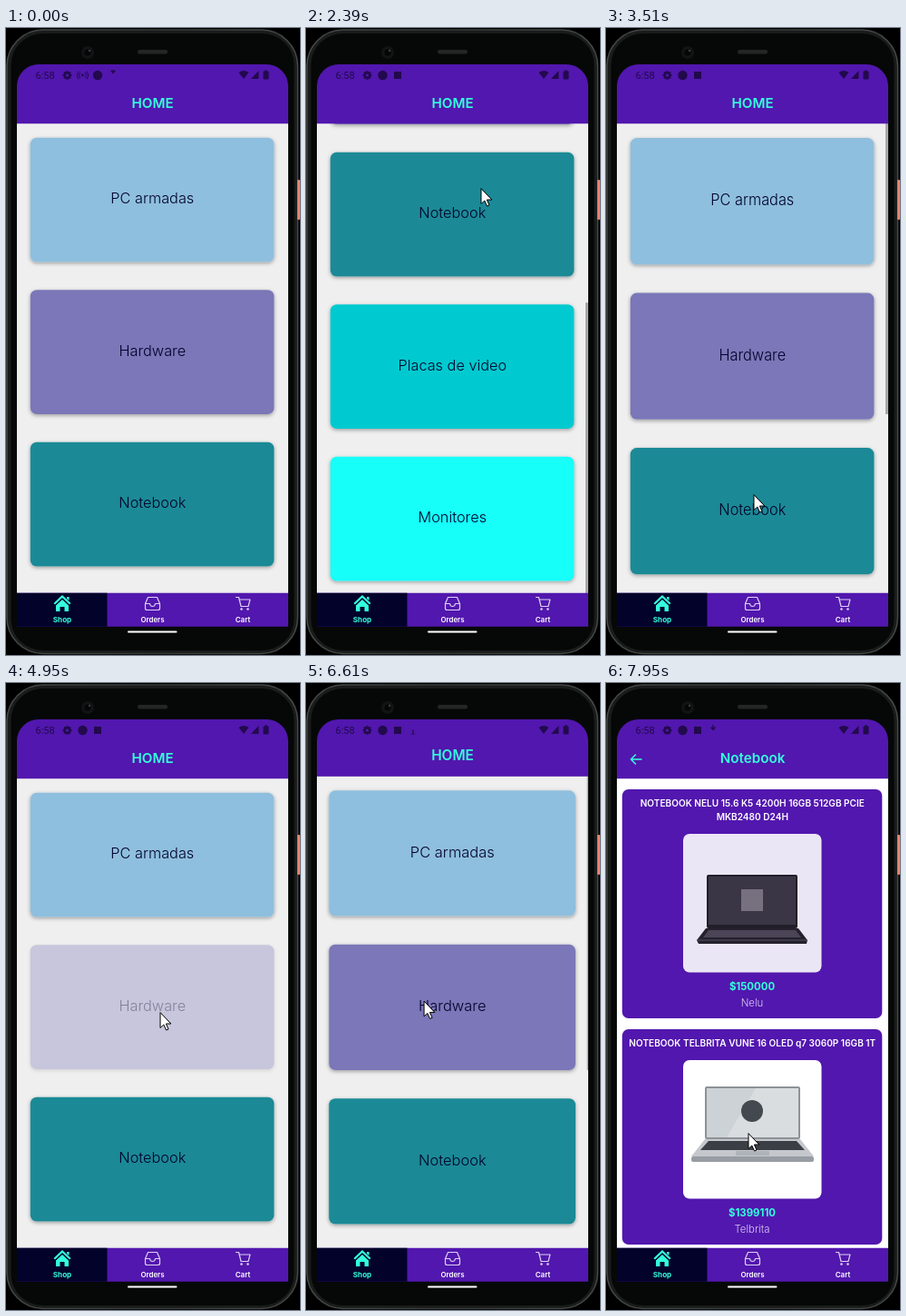
An HTML page with a canvas for the animation above (8 s loop, 324 by 690 pixels).

```html
<!DOCTYPE html>
<html lang="es">
<head>
<meta charset="utf-8">
<title>Shop app</title>
<style>
html, body { margin: 0; width: 100%; height: 100%; overflow: hidden; background: #000; }
canvas { display: block; width: 324px; height: 690px; }
</style>
</head>
<body>
<canvas id="stage"></canvas>
<script>
const W = 324, H = 690, LOOP = 8000;
const PURPLE = '#5217ae', MINT = '#33ffdc', NAVY = '#02022b', PALE = '#dccff2', PAGE = '#efefef';
const VIEW = { x: 12, top: 40, list: 105, width: 299 };
const canvas = document.getElementById('stage');
const ctx = canvas.getContext('2d');
const ratio = window.devicePixelRatio || 1;
canvas.width = W * ratio;
canvas.height = H * ratio;

const categories = [
  ['PC armadas', '#8fbfde'], ['Hardware', '#7b77b8'], ['Notebook', '#1b8a96'],
  ['Placas de video', '#00cacf'], ['Monitores', '#16fff9']
];
const notebooks = [
  { title: ['NOTEBOOK NELU 15.6 K5 4200H 16GB 512GB PCIE', 'MKB2480 D24H'], price: '$150000', brand: 'Nelu', tone: '#ebe6f5', art: darkLaptop },
  { title: ['NOTEBOOK TELBRITA VUNE 16 OLED q7 3060P 16GB 1T'], price: '$1399110', brand: 'Telbrita', tone: '#fff', art: silverLaptop }
];
const hardware = [
  { title: ['PLACA MADRE TORVANE B40 DDR4 MICRO ATX 4 SLOTS', 'HDMI USB 3.2'], price: '$28500', brand: 'Torvane', tone: '#fff', art: board },
  { title: ['MEMORIA RAM LUMEDO 16GB DDR4 3200MHZ'], price: '$19900', brand: 'Lumedo', tone: '#fff', art: memory }
];

// Keyframes: [time, value, ...], linear in between
const cursorKeys = [
  [880, 286, 600], [1180, 198, 417], [1360, 195, 380], [1700, 193, 200], [1800, 193, 177],
  [2560, 193, 177], [3250, 163, 514], [3515, 163, 514], [3890, 170, 363], [5250, 170, 363],
  [5730, 106, 398], [5800, 106, 398], [6140, 27, 78], [6330, 27, 78], [6610, 130, 350], [6950, 157, 496]
];
const scrollKeys = [[1200, 0], [1360, 33], [1700, 213], [1950, 319], [2580, 319], [3210, 0]];
const stretchKeys = [[3200, 0], [3250, .018], [3515, .018], [3870, 0]];
const barKeys = [[1200, 0], [1260, 1], [3600, 1], [3890, 0], [6330, 0], [6340, 1], [6900, 1], [7070, 0]];
const pressKeys = {
  Hardware: [[4470, 1], [4630, .2], [4920, .2], [4950, .34], [5100, 1]],
  Notebook: [[7070, 1], [7230, .2], [7380, .2], [7530, 1]]
};
const OPEN_HARDWARE = 5060, GO_BACK = 6324, OPEN_NOTEBOOK = 7440, SWITCH = 500;

const clamp = v => Math.max(0, Math.min(1, v));

function at(keys, t, column = 1) {
  if (t <= keys[0][0]) return keys[0][column];
  for (let i = 1; i < keys.length; i++) {
    const a = keys[i - 1], b = keys[i];
    if (t < b[0]) return a[column] + (b[column] - a[column]) * (t - a[0]) / (b[0] - a[0]);
  }
  return keys[keys.length - 1][column];
}

function box(x, y, w, h, color, r = 0) {
  ctx.fillStyle = color;
  ctx.beginPath();
  ctx.roundRect(x, y, w, h, r);
  ctx.fill();
}

function disc(x, y, r, color) {
  ctx.fillStyle = color;
  ctx.beginPath();
  ctx.arc(x, y, r, 0, 7);
  ctx.fill();
}

function shape(d, color) {
  ctx.fillStyle = color;
  ctx.fill(new Path2D(d));
}

function line(d, color, width = 1) {
  ctx.strokeStyle = color;
  ctx.lineWidth = width;
  ctx.lineCap = ctx.lineJoin = 'round';
  ctx.stroke(new Path2D(d));
}

function text(str, x, y, size, color, weight = 400) {
  ctx.font = `${weight} ${size}px Inter, sans-serif`;
  ctx.textAlign = 'center';
  ctx.textBaseline = 'alphabetic';
  ctx.fillStyle = color;
  ctx.fillText(str, x, y + size * .36);
}

function scoped(draw) {
  ctx.save();
  draw();
  ctx.restore();
}

function clipBox(x, y, w, h, r = 0) {
  ctx.beginPath();
  ctx.roundRect(x, y, w, h, r);
  ctx.clip();
}

function header(title) {
  box(VIEW.x, VIEW.top, VIEW.width, 65.3, PURPLE);
  text(title, 161.5, 82.7, 15.2, MINT, 600);
}

function homeScreen(t) {
  const scroll = at(scrollKeys, t);
  box(VIEW.x, VIEW.list, VIEW.width, 517, PAGE);
  scoped(() => {
    clipBox(VIEW.x, VIEW.list, VIEW.width, 517);
    scoped(() => {
      ctx.translate(0, VIEW.list);
      ctx.scale(1, 1 + at(stretchKeys, t));
      ctx.translate(0, -VIEW.list - scroll);
      categories.forEach(([name, color], i) => {
        const y = 120.8 + i * 167.5;
        const press = pressKeys[name] ? at(pressKeys[name], t) : 1;
        scoped(() => {
          ctx.shadowColor = `rgba(0,0,0,${.35 * press})`;
          ctx.shadowBlur = 4 * ratio;
          ctx.shadowOffsetY = 1.5 * ratio;
          box(26.8, y, 268.7, 136.7, PAGE, 7);
        });
        scoped(() => {
          ctx.globalAlpha *= press;
          box(26.8, y, 268.7, 136.7, color, 7);
          text(name, 161.3, y + 66.8, 16.3, NAVY, 300);
        });
      });
    });
    ctx.globalAlpha *= at(barKeys, t);
    box(308, VIEW.list + scroll * .618, 3, 320, '#a5a5a8');
  });
  header('HOME');
}

function productScreen(title, products) {
  box(VIEW.x, VIEW.list, VIEW.width, 517, '#fff');
  let y = 117;
  for (const p of products) {
    const imageY = y + 19 + 15 * p.title.length;
    box(17.8, y, 286.5, imageY + 203 - y, PURPLE, 7);
    p.title.forEach((row, i) => text(row, 161.3, y + 15.5 + i * 15, 10.1, '#fff', 600));
    box(85, imageY, 152.5, 152.5, p.tone, 7);
    scoped(() => {
      ctx.translate(85, imageY);
      p.art();
    });
    text(p.price, 161, imageY + 168, 11.4, MINT, 700);
    text(p.brand, 161, imageY + 186, 11.4, PALE, 300);
    y = imageY + 215;
  }
  header(title);
  line('M39 84H28M32.5 79L27.5 84L32.5 89', MINT, 1.5);
}

function darkLaptop() {
  box(26, 45, 100, 59, '#211e29', 2);
  box(28, 47, 96, 53, '#3b3646');
  box(64, 61, 24, 24, '#77717f');
  shape('M25 104H127L137 117L136 121H17L15 117Z', '#25212d');
  shape('M28 106H124L130 114H22Z', '#4b4557');
  line('M16 117H136', '#625b6e', .8);
}

function silverLaptop() {
  box(24, 29, 105, 58, '#8d9298', 2);
  box(26, 31, 101, 54, '#d9dde0');
  shape('M26 31H80L48 85H26Z', '#cdd2d6');
  disc(76, 56, 12, '#44494f');
  shape('M24 87H129L144 106H9Z', '#c4c8cd');
  shape('M28 89H125L134 99H19Z', '#3b3f45');
  box(58, 100, 37, 5, '#aeb3b9', 1);
  box(9, 106, 135, 6, '#989da4', 2);
}

function board() {
  box(31, 25, 90, 102, '#25272d', 3);
  box(57, 44, 30, 30, '#a9adb3', 2);
  box(34, 29, 14, 42, '#777c85', 2);
  for (let i = 0; i < 4; i++) box(97 + i * 5, 35, 2.5, 54, '#555a64');
  for (let i = 0; i < 3; i++) box(43, 89 + i * 12, 47, 4, '#60656f');
}

function memory() {
  for (const y of [46, 83]) {
    box(17, y, 118, 25, '#292b31', 2);
    box(22, y + 5, 108, 9, '#555961');
    box(21, y + 25, 110, 4, '#c6a85a');
  }
}

// Opening: the list grows away under the page. Closing: the list shrinks back, the page drops away.
function screens(t) {
  const layer = (scale, alpha, draw) => scoped(() => {
    ctx.globalAlpha = alpha;
    ctx.translate(161.5, 335);
    ctx.scale(scale, scale);
    ctx.translate(-161.5, -335);
    draw();
  });
  const home = () => homeScreen(t);
  const late = t >= OPEN_NOTEBOOK;
  const page = () => late ? productScreen('Notebook', notebooks) : productScreen('Hardware', hardware);
  const closing = t >= GO_BACK && !late;
  const start = late ? OPEN_NOTEBOOK : closing ? GO_BACK : OPEN_HARDWARE;
  const progress = clamp((t - start) / SWITCH);
  const eased = 1 - (1 - progress) ** 3;
  const fade = clamp((t - start - 40) / 110);

  scoped(() => {
    clipBox(VIEW.x, VIEW.top, VIEW.width, 582, [24, 24, 0, 0]);
    if (t < OPEN_HARDWARE) home();
    else if (closing) {
      layer(1.15 - .15 * eased, 1, home);
      if (fade < 1) layer(1 - .15 * eased, 1 - fade, page);
    } else {
      if (progress < 1) layer(1 + .15 * eased, 1, home);
      layer(.85 + .15 * eased, fade, page);
    }
  });
}

function gear(x, y, color) {
  for (let i = 0; i < 4; i++) scoped(() => {
    ctx.translate(x, y);
    ctx.rotate(i * Math.PI / 4);
    box(-1.2, -4.8, 2.4, 9.6, color, .5);
  });
  disc(x, y, 3.6, color);
  disc(x, y, 1.6, PURPLE);
}

function statusBar(t) {
  const ink = '#220a4d';
  ctx.font = '400 11px Roboto, sans-serif';
  ctx.textAlign = 'left';
  ctx.textBaseline = 'alphabetic';
  ctx.fillStyle = ink;
  ctx.fillText('6:58', 32.5, 55.5);
  gear(67.5, 52, ink);
  const early = t < 1800;
  disc(early ? 101 : 84.5, 52, 5.2, ink);
  if (t < 1000) {
    disc(84.5, 52, 1.4, ink);
    line('M81.5 49Q79.5 52 81.5 55M87.5 49Q89.5 52 87.5 55M79.5 48Q77 52 79.5 56M89.5 48Q92 52 89.5 56', ink);
  } else {
    box(early ? 80.5 : 97, 48, 8, 8, ink);
  }
  if (early || t > 5700) scoped(() => {
    clipBox(114, 46, 9, 11);
    ctx.translate(0, Math.floor(t / 160) % 6 * 2 - 5);
    line('M118 47V54M116 52L118 54.5L120 52', ink, 1.3);
  });
  shape('M256.5 49Q262 45 267.5 49L262 56Z', ink);
  shape('M270 56H278.5V47Z', ink);
  box(283.5, 47.5, 6, 9, ink, 1);
  box(285, 46.5, 3, 2, ink);
}

function tabBar() {
  box(12, 621.7, 299, 37, PURPLE);
  box(12, 621.7, 99.5, 37, NAVY);
  shape('M62 624L71.5 633L70 634.5L62 627L54 634.5L52.5 633ZM67 626H69.5V630L67 628ZM62 629L69 635.5V642H64.5V637H59.5V642H55V635.5Z', MINT);
  line('M156.5 626.5H166.5L169.5 633.5V638.5Q169.5 640.5 167.5 640.5H155.5Q153.5 640.5 153.5 638.5V633.5ZM153.5 633.5H158.5Q159 636.5 161.5 636.5T164.5 633.5H169.5', PALE, 1.2);
  line('M253.5 626.5H256.5L259 636.5H267L269 629H257.2', PALE, 1.2);
  disc(259.5, 639.5, 1.3, PALE);
  disc(266.5, 639.5, 1.3, PALE);
  text('Shop', 62, 651, 8.1, MINT, 700);
  text('Orders', 161.5, 651, 7.9, '#fff', 600);
  text('Cart', 261, 651, 8, '#fff', 600);
}

function phone() {
  box(0, 0, W, H, '#000');
  box(1, 2, 320.5, 686.5, '#191c1b', 40);
  const rim = ctx.createLinearGradient(0, 0, W, 0);
  rim.addColorStop(0, '#454a49');
  rim.addColorStop(.5, '#343938');
  rim.addColorStop(1, '#454a49');
  ctx.strokeStyle = rim;
  ctx.lineWidth = 1.5;
  ctx.stroke();
  box(5.5, 6, 312, 679, '#060807', 35);
  box(321, 167, 3, 44, '#e9826d', 1);
  disc(90, 27, 7, '#111414');
  disc(90, 27, 3.5, '#050606');
  disc(92, 25, 1.2, '#3a4142');
  box(145, 24, 33, 4.5, '#222625', 2);
}

function cursor(t) {
  if (t < cursorKeys[0][0]) return;
  scoped(() => {
    ctx.translate(at(cursorKeys, t), at(cursorKeys, t, 2));
    const arrow = 'M0 0V16.5L3.8 13L6.5 19L9 18L6.4 12H11.5Z';
    shape(arrow, '#fff');
    line(arrow, '#000', 1);
  });
}

function render(now) {
  const t = now % LOOP;
  ctx.setTransform(ratio, 0, 0, ratio, 0, 0);
  phone();
  screens(t);
  statusBar(t);
  tabBar();
  box(134, 663.5, 54.5, 2, '#fff', 1);
  cursor(t);
}

const begin = performance.now();
function frame() {
  render(performance.now() - begin);
  requestAnimationFrame(frame);
}
frame();
</script>
</body>
</html>
```
